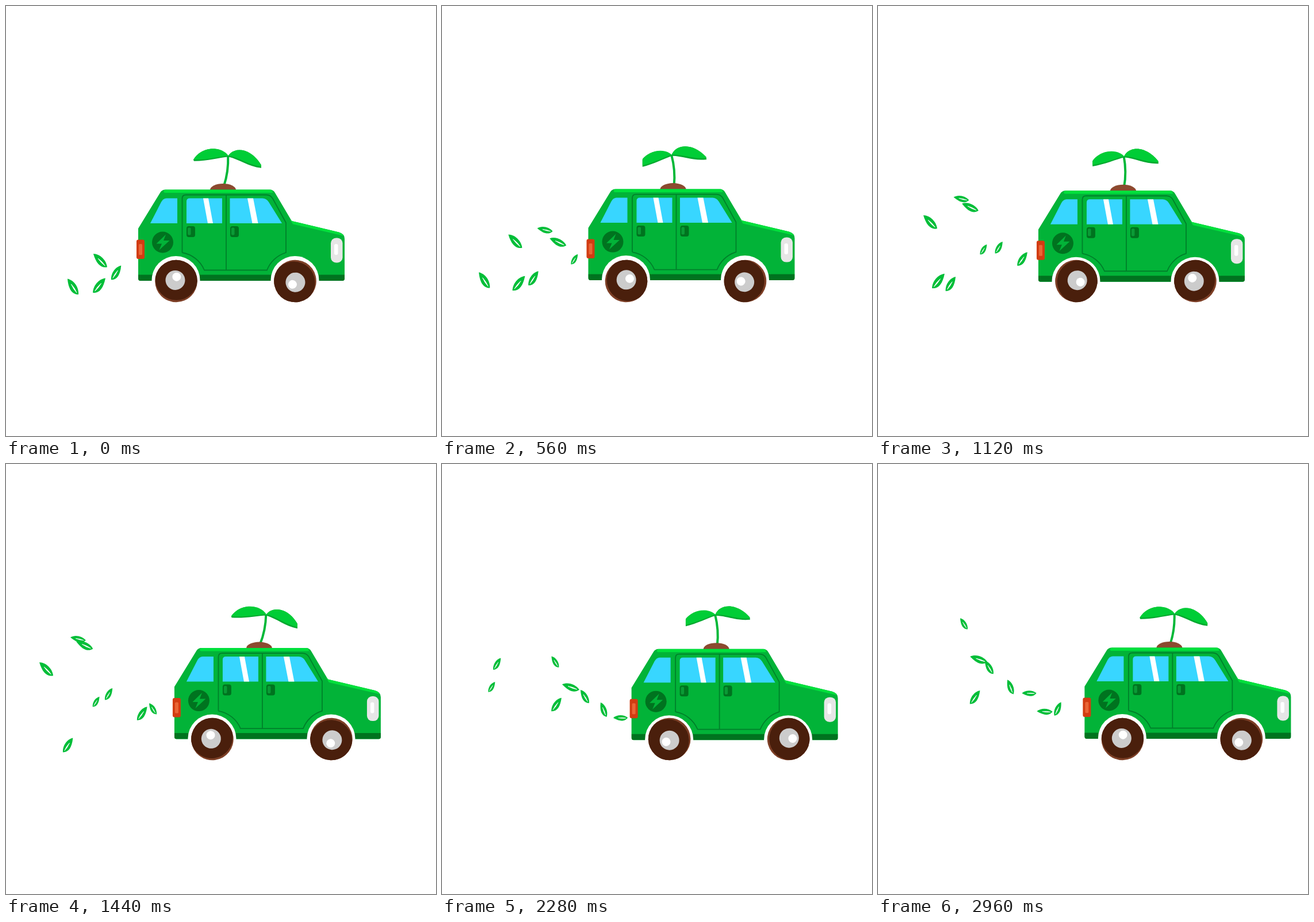
These frames come from a looping animation (748x748 px, 3 s). An HTML page:

```html
<!DOCTYPE html>
<html lang="en">
<head>
<meta charset="utf-8">
<title>Green car</title>
<style>
  html, body { margin: 0; width: 100%; height: 100%; overflow: hidden; background: #fff; }
  svg { display: block; width: 100vw; height: 100vh; }
</style>
</head>
<body>
<svg viewBox="0 0 748 748">
  <defs>
    <clipPath id="sproutBox"><path d="M324.3 200H444V330H324.3z"/></clipPath>
    <clipPath id="tyre"><circle r="36.8"/></clipPath>
    <clipPath id="shell"><path id="outline" d="M230 387L268 325Q271 319.5 277 319.5H459Q465 319.5 468 325L497 374L579 393.5Q589 396 589 405V474Q589 478 585 478H234Q230 478 230 474z"/></clipPath>
    <g id="leaf">
      <path d="M-2-16C7-9 9 6 3 16C-7 11-8 0-2-16z" fill="#00be38"/>
      <path d="M-.4-5Q2.4 4 1.6 12Q-1 4-.4-5z" fill="#fff" stroke="#fff" stroke-width=".7"/>
    </g>
    <g id="wheel">
      <circle r="36.8" fill="#7d3f26"/>
      <circle cx="3.4" cy="-.9" r="36.8" fill="#4a1f0c" clip-path="url(#tyre)"/>
      <circle cx=".9" cy="-2" r="17" fill="#ccc"/>
      <circle cx="7.1" cy="-2" r="7.5" fill="#fff"/>
    </g>
    <g id="handle">
      <rect width="15" height="19" rx="4" fill="#00731f"/>
      <rect x="2" y="2.5" width="5.5" height="13" rx="2" fill="#0a9a35"/>
    </g>
  </defs>

  <g id="leaves"></g>

  <g id="car">
    <g id="body">
      <g clip-path="url(#sproutBox)">
        <g id="sprout">
          <path d="M379 313Q386.5 288 384.5 260" fill="none" stroke="#00b838" stroke-width="4"/>
          <path d="M385 262C372 243 338 245 324.5 269L325.5 271.5C348 271 370 264 385 262C405 266 420 278 443 279.5L443 275C425 246 396 243 385 260z" fill="#00a82f"/>
          <path d="M385 260C372 243 338 245 324.5 269C348 269 370 262 385 260C405 263 420 275 443 277L443 275C425 246 396 243 385 260z" fill="#00cd36"/>
        </g>
      </g>
      <path d="M355 320A22.5 11 0 0 1 400 320z" fill="#8c4a2f"/>

      <use href="#outline" fill="#02b338"/>
      <g clip-path="url(#shell)">
        <path d="M229 467.5H590V479H229z" fill="#00731f"/>
        <path d="M277 319H461Q463 320 464 325H277Q274 325 274 322z" fill="#00e03c"/>
        <path d="M494 371L579 392L588 400L499 379.5z" fill="#00e03c"/>
      </g>

      <g fill="#38d6ff">
        <path d="M251 378L270 341Q273.500 334.500 279 334.500H298V378z"/>
        <path d="M314 378V340Q314 334.500 319.500 334.500H376V378z"/>
        <path d="M389.500 378V334.500H446Q453 334.500 457 341L480 378z"/>
      </g>
      <path d="M343 334.500H352L360 378H351zM420 334.500H430L438.500 378H428.500z" fill="#fff"/>

      <path d="M306.500 429V335Q306.500 328.500 313 328.500H453Q460 328.500 464 335L487 377V429A51 51 0 0 0 454 459.500H345A51 51 0 0 0 306.500 429M383 328.500V459.500" fill="none" stroke="#00802a" stroke-width="1.800"/>
      <use href="#handle" x="314" y="383"/>
      <use href="#handle" x="390" y="383"/>

      <circle cx="272.500" cy="411" r="18.500" fill="#00731f"/>
      <path d="M278 397.500L261.500 413.500H271L266.500 424.500L284.500 408H274z" fill="#02b338"/>

      <rect x="227" y="406.500" width="14" height="33.500" rx="3" fill="#d23c12"/>
      <rect x="231" y="414" width="6" height="19" rx="1.500" fill="#ea6535"/>
      <rect x="565" y="403.500" width="20.500" height="43" rx="9" fill="#e6e6e6"/>
      <rect x="571" y="414" width="6.500" height="19" rx="3" fill="#fff"/>

      <g fill="#fff">
        <circle cx="295.500" cy="477" r="42"/>
        <circle cx="502.500" cy="477" r="42"/>
      </g>
    </g>
    <use id="rear" href="#wheel"/>
    <use id="front" href="#wheel"/>
  </g>
</svg>

<script>
const LOOP = 3000, STEP = 40, TURN = 2960 / 6, SPEED = 0.0437;
const FIRST = -984, GAP = 251, LIFE = 1980;

// One row per leaf, in order of release: vx, vy (px/ms), tilt, length, start offset x, y
const leaves = [
  [-.0765, -.02, -26, 33, 23.3, 66],
  [-.051, -.007, 32, 33, 20.9, 49.6],
  [-.0652, -.0598, -37, 33, 5, 29.8],
  [-.0583, .0175, 26, 30, 4.6, 18],
  [-.061, -.0968, -70, 27],
  [-.0738, -.108, -58, 31],
  [-.0837, -.0307, 25, 21],
  [-.0987, -.0624, 24, 24],
  [-.0448, -.0186, 28, 29],
  [-.0698, -.0973, -25, 23],
  [-.0716, -.0711, -64, 31],
  [-.0809, -.0744, -24, 27],
  [-.0747, -.0579, -14, 27],
  [-.07, -.0631, -82, 25],
  [-.0735, -.0256, -80, 27],
  [-.109, -.089, 18, 26]
];

const $ = id => document.getElementById(id);
const move = (el, value) => el.setAttribute('transform', value);

const leafNodes = leaves.map(() => {
  const use = document.createElementNS('http://www.w3.org/2000/svg', 'use');
  use.setAttribute('href', '#leaf');
  return $('leaves').appendChild(use);
});

function drawLeaf(node, i, t) {
  const [vx, vy, tilt, length, dx = 0, dy = 0] = leaves[i];
  const birth = FIRST + GAP * i, age = t - birth;
  const shown = age >= 0 && age < LIFE;
  node.setAttribute('visibility', shown ? 'visible' : 'hidden');
  if (!shown) return;
  const x = 211 + SPEED * birth + dx + vx * age;
  const y = 442 + dy + vy * age;
  const size = length / 32, flip = tilt > 0 ? -size : size;
  move(node, `translate(${x} ${y}) rotate(${tilt}) scale(${flip} ${size})`);
}

function draw(t) {
  const turns = t / TURN, spin = 144 + 360 * turns;
  const bounce = 2.3 * Math.sin(Math.PI * turns);
  const sway = -3.2 - 8.7 * Math.cos(2 * Math.PI * (2 * turns - .35));
  move($('car'), `translate(${SPEED * t})`);
  move($('body'), `translate(0 ${bounce})`);
  move($('sprout'), `rotate(${sway} 378 312)`);
  move($('rear'), `translate(296 478.500) rotate(${spin + 148})`);
  move($('front'), `translate(503 478.500) rotate(${spin})`);
  leafNodes.forEach((node, i) => drawLeaf(node, i, t));
}

const start = performance.now();
function tick() {
  const t = (performance.now() - start) % LOOP;
  draw(Math.floor(t / STEP) * STEP);
  requestAnimationFrame(tick);
}
tick();
</script>
</body>
</html>
```
